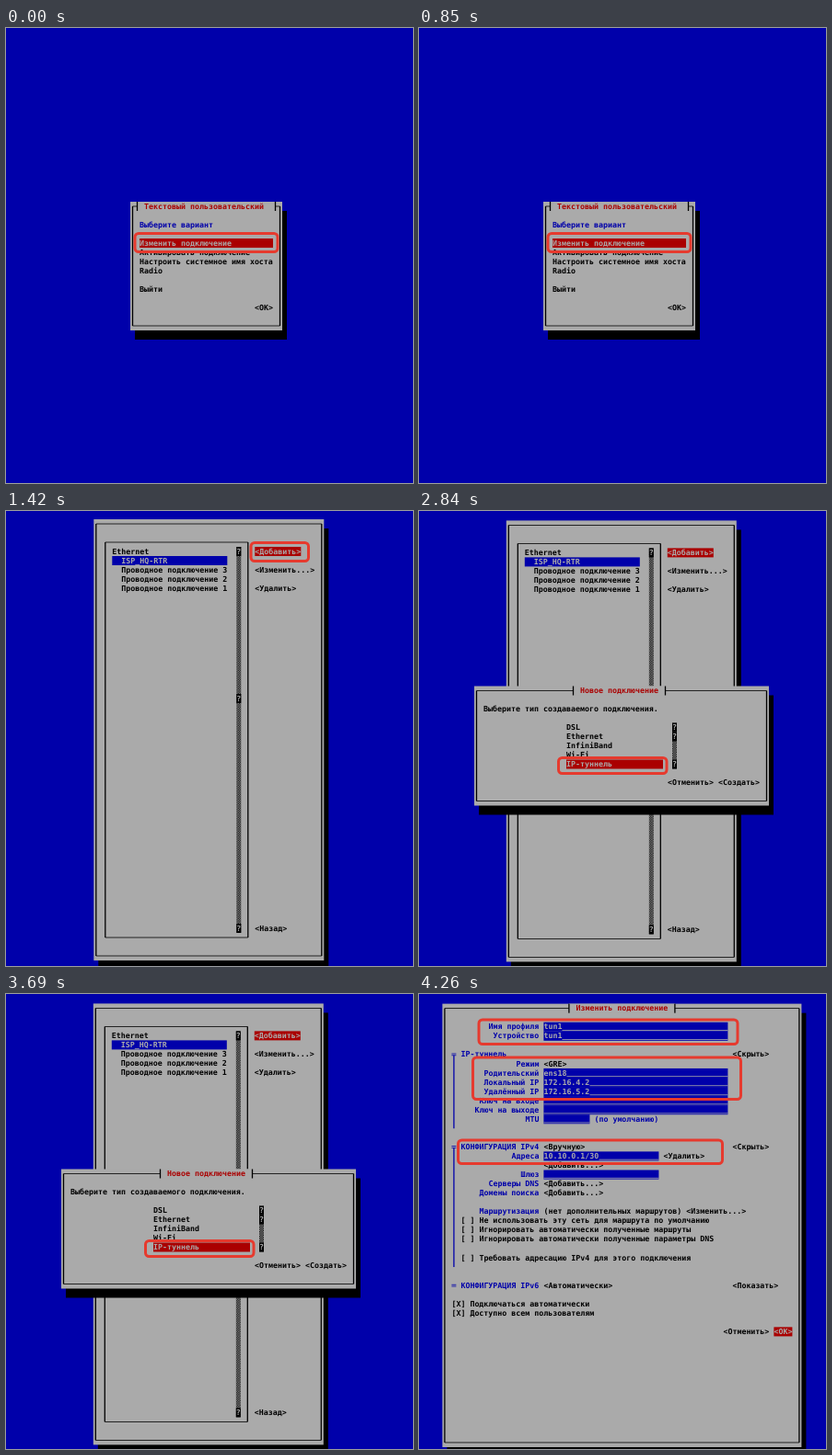
An HTML page that plays this animation: 442x495 px, repeating every 5680 ms.

```html
<!DOCTYPE html>
<html lang="ru">
<head>
<meta charset="utf-8">
<title>Настройка туннеля</title>
<style>
  html, body { margin: 0; width: 100%; height: 100%; overflow: hidden; background: #0000aa; }
  svg { display: block; width: 442px; height: 495px; }
  text {
    font: bold 8.305px "DejaVu Sans Mono", "Liberation Mono", monospace;
    white-space: pre;
    text-rendering: geometricPrecision;
  }
  .scene { visibility: hidden; animation: show 5680ms step-end infinite; }
  .mark { fill: none; stroke: #e63a2e; stroke-width: 3; }
  @keyframes show {
    0% { visibility: visible; }
    25%, 100% { visibility: hidden; }
  }
</style>
</head>
<body>
<svg id="stage" viewBox="0 0 442 495" xmlns="http://www.w3.org/2000/svg"></svg>
<script>
const BLACK = '#000', GREY = '#aaaaaa', BLUE = '#0000aa', RED = '#aa0000';
const CW = 5, CH = 10; // size of a terminal cell

const esc = s => s.replace(/&/g, '&amp;').replace(/</g, '&lt;');
const box = (x, y, w, h, fill) =>
  `<rect x="${x}" y="${y}" width="${w}" height="${h}" fill="${fill}"/>`;

// Everything below takes columns and rows
const fill = (c, r, w, h, color) => box(c * CW, r * CH, w * CW, h * CH, color);
const text = (c, r, s, color = BLACK) =>
  `<text x="${c * CW}" y="${r * CH + 7.6}" fill="${color}">${esc(s)}</text>`;
const label = (end, r, s) => text(end - s.length, r, s, BLUE);
const bar = (c, r, w, s, color, indent = 0) =>
  fill(c, r, w, 1, color) + text(c + indent, r, s, GREY);
const hline = (x1, x2, y, color = BLACK) => box(x1, y - 0.4, x2 - x1, 0.8, color);
const vline = (x, y1, y2, color = BLACK) => box(x - 0.65, y1, 1.3, y2 - y1, color);

function frame(c1, r1, c2, r2) {
  const x1 = (c1 + 0.5) * CW, x2 = (c2 + 0.5) * CW;
  const y1 = (r1 + 0.5) * CH, y2 = (r2 + 0.5) * CH;
  return hline(x1, x2, y1) + hline(x1, x2, y2) + vline(x1, y1, y2) + vline(x2, y1, y2);
}

function panel(w, h) {
  return fill(1, 1, w, h, BLACK) + fill(0, 0, w, h, GREY) + frame(0, 0, w - 1, h - 1);
}

function title(left, right, s) {
  return fill(left + 0.5, 0, right - left, 1, GREY) +
    vline((left + 0.5) * CW, 0, CH) + vline((right + 0.5) * CW, 0, CH) +
    text(left + 2, 0, s, RED);
}

function scroll(c, r1, r2, knob) {
  return fill(c, r1, 1, r2 - r1 + 1, 'url(#hatch)') +
    [r1, knob, r2].map(r => bar(c, r, 1, '?', BLACK)).join('');
}

function entry(r, w, s = '') {
  return bar(22, r, w, s, BLUE) +
    hline((22 + s.length) * CW, (22 + w) * CW, r * CH + 8.7, GREY);
}

function section(r, s, last) {
  const x = 2 * CW, y = (r + 0.5) * CH;
  return hline(x, x + CW, y - 0.9, BLUE) + hline(x, x + CW, y + 0.9, BLUE) +
    (last ? vline(x + CW / 2, y + 0.9, (last + 0.5) * CH, BLUE) : '') +
    text(4, r, s, BLUE);
}

const at = (x, y, parts, sy = 1) =>
  `<g transform="translate(${x} ${y}) scale(1 ${sy})">${parts.join('')}</g>`;
const mark = (x1, y1, x2, y2) =>
  `<rect class="mark" x="${x1}" y="${y1}" width="${x2 - x1}" height="${y2 - y1}" rx="4"/>`;

const menu = at(135, 189, [
  panel(33, 14),
  title(1, 31, 'Текстовый пользовательский'),
  text(2, 2, 'Выберите вариант', BLUE),
  bar(2, 4, 29, 'Изменить подключение', RED),
  text(2, 5, 'Активировать подключение'),
  text(2, 6, 'Настроить системное имя хоста'),
  text(2, 7, 'Radio'),
  text(2, 9, 'Выйти'),
  text(27, 11, '<OK>')
]);

const list = [
  panel(50, 48),
  frame(2, 2, 33, 45),
  text(4, 3, 'Ethernet'),
  bar(4, 4, 25, 'ISP_HQ-RTR', BLUE, 2),
  ...[3, 2, 1].map((n, i) => text(6, 5 + i, 'Проводное подключение ' + n)),
  scroll(31, 3, 44, 19),
  bar(35, 3, 10, '<Добавить>', RED),
  text(35, 5, '<Изменить...>'),
  text(35, 7, '<Удалить>'),
  text(35, 44, '<Назад>')
];

const dialog = at(60, 190.5, [
  panel(64, 13),
  title(21, 41, 'Новое подключение'),
  text(2, 2, 'Выберите тип создаваемого подключения.'),
  ...['DSL', 'Ethernet', 'InfiniBand', 'Wi-Fi'].map((s, i) => text(20, 4 + i, s)),
  bar(20, 8, 21, 'IP-туннель', RED),
  scroll(43, 4, 8, 5),
  text(42, 10, '<Отменить>'),
  text(53, 10, '<Создать>')
]);

const form = at(25.4, 10.6, [
  panel(78, 48),
  title(27, 50, 'Изменить подключение'),
  label(21, 2, 'Имя профиля'), entry(2, 40, 'tun1'),
  label(21, 3, 'Устройство'), entry(3, 40, 'tun1'),

  section(5, 'IP-туннель', 13), text(63, 5, '<Скрыть>'),
  label(21, 6, 'Режим'), text(22, 6, '<GRE>'),
  label(21, 7, 'Родительский'), entry(7, 40, 'ens18'),
  label(21, 8, 'Локальный IP'), entry(8, 40, '172.16.4.2'),
  label(21, 9, 'Удалённый IP'), entry(9, 40, '172.16.5.2'),
  label(21, 10, 'Ключ на входе'), entry(10, 40),
  label(21, 11, 'Ключ на выходе'), entry(11, 40),
  label(21, 12, 'MTU'), entry(12, 10), text(33, 12, '(по умолчанию)', BLUE),

  section(15, 'КОНФИГУРАЦИЯ IPv4', 28), text(22, 15, '<Вручную>'), text(63, 15, '<Скрыть>'),
  label(21, 16, 'Адреса'), entry(16, 25, '10.10.0.1/30'), text(48, 16, '<Удалить>'),
  text(22, 17, '<Добавить...>'),
  label(21, 18, 'Шлюз'), entry(18, 25),
  label(21, 19, 'Серверы DNS'), text(22, 19, '<Добавить...>'),
  label(21, 20, 'Домены поиска'), text(22, 20, '<Добавить...>'),
  label(21, 22, 'Маршрутизация'),
  text(22, 22, '(нет дополнительных маршрутов) <Изменить...>'),
  text(4, 23, '[ ] Не использовать эту сеть для маршрута по умолчанию'),
  text(4, 24, '[ ] Игнорировать автоматически полученные маршруты'),
  text(4, 25, '[ ] Игнорировать автоматически полученные параметры DNS'),
  text(4, 27, '[ ] Требовать адресацию IPv4 для этого подключения'),

  section(30, 'КОНФИГУРАЦИЯ IPv6'), text(22, 30, '<Автоматически>'), text(63, 30, '<Показать>'),
  text(2, 32, '[X] Подключаться автоматически'),
  text(2, 33, '[X] Доступно всем пользователям'),
  text(61, 35, '<Отменить>'),
  bar(72, 35, 4, '<ОК>', RED)
], 1.005);

const scenes = [
  menu + mark(140, 223.5, 295, 243.5),
  at(95.3, 9, list) + mark(266, 34.5, 328.5, 54.5),
  at(94.8, 10.4, list) + dialog + mark(151.5, 268.5, 269, 285.5),
  form + mark(65, 28, 346, 54.5) + mark(58.5, 69, 349.5, 114.5) + mark(42.5, 159, 329.5, 184.5)
];

document.getElementById('stage').innerHTML =
  `<defs><pattern id="hatch" width="2.5" height="2.5" patternUnits="userSpaceOnUse">
    ${box(0, 0, 2.5, 2.5, '#8a8a8a')}${box(0, 0, 1.25, 1.25, '#111')}${box(1.25, 1.25, 1.25, 1.25, '#111')}
  </pattern></defs>` +
  box(0, 0, 442, 495, BLUE) +
  scenes.map((s, i) =>
    `<g class="scene" style="animation-delay:${i ? (i - 4) * 1420 : 0}ms">${s}</g>`).join('');
</script>
</body>
</html>
```
